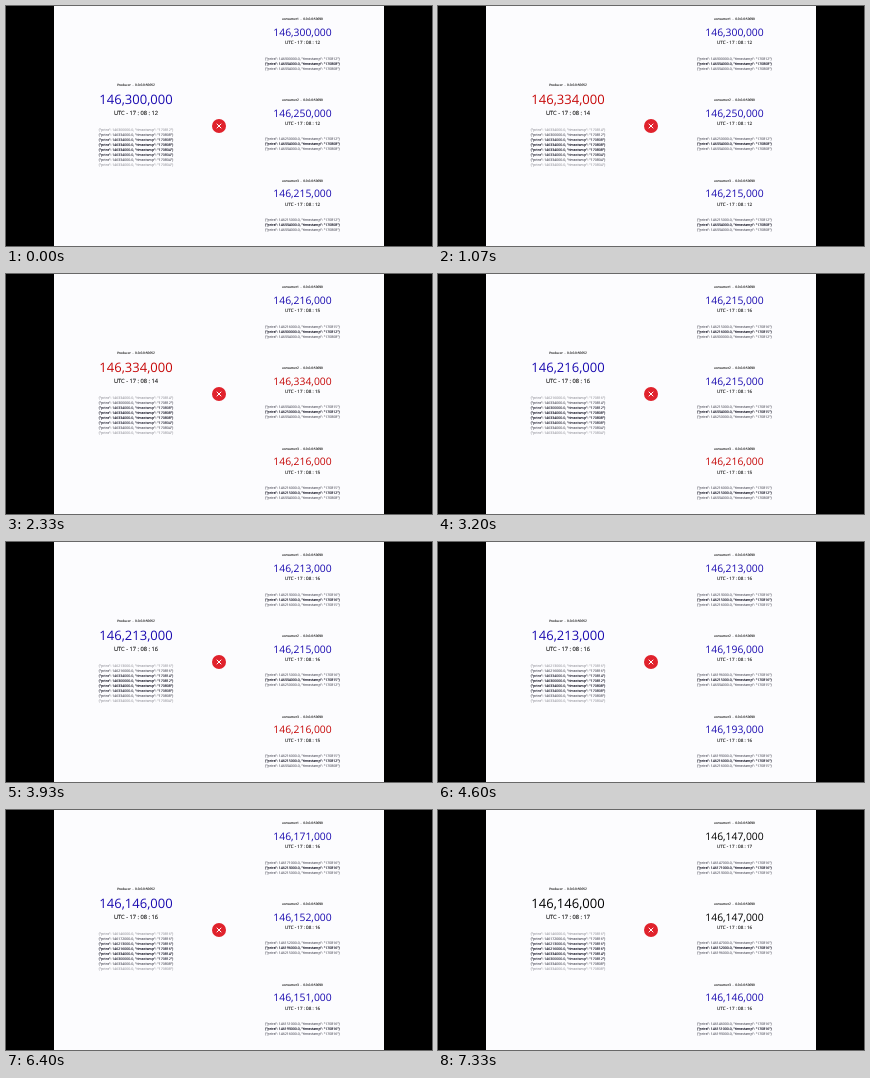
An HTML page that plays this animation: 426x240 px, repeating every 7390 ms.

```html
<!DOCTYPE html>
<html lang="en">
<head>
<meta charset="utf-8">
<title>Price stream</title>
<style>
  html, body { margin: 0; width: 100%; height: 100%; overflow: hidden; background: #000; }
  svg { display: block; width: 100vw; height: 100vh; }
  text { font-family: "Open Sans", "Noto Sans", sans-serif; text-rendering: geometricPrecision; white-space: pre; }
  .mid { text-anchor: middle; }
  .small { stroke: currentColor; stroke-width: .12px; }
</style>
</head>
<body>
<svg viewBox="0 0 426 240">
  <rect width="426" height="240"/>
  <rect x="48" width="330" height="240" fill="#fcfcfe"/>
  <g id="panels"></g>
  <circle cx="213" cy="120" r="7" fill="#e0222c"/>
  <path d="M211 118l4 4m0-4l-4 4" stroke="#fff" stroke-width="1" stroke-linecap="round"/>
</svg>
<script>
const LOOP = 7390, ROUND = 1300;
const SETTLE = 5.55, NEXT_SECOND = 5.6; // in rounds
const UP = '#c60808', DOWN = '#1a0bb0', SAME = '#000';

// Prices in thousands, one per round; pace is seconds of clock per round
const producer = { name: 'Producer  -  0.0.0.0:50052', prices: [300, 334, 216, 213, 172, 146],
  delay: -260, pace: 2, cx: 130, y: 79.6, size: 13, priceY: 18.5, clockY: 29, logY: 45.4, rows: 8 };
const consumers = [
  [300, 216, 215, 213, 171, 147],
  [250, 334, 215, 196, 152, 147],
  [215, 216, 216, 193, 151, 146]
].map((prices, n) => ({ name: `consumer${n + 1}  -  0.0.0.0:50090`, prices,
  delay: 80 * n, pace: 3, cx: 296.5, y: 14.4 + 80.7 * n, size: 10.35,
  priceY: 15.6, clockY: 24, logY: 39.2, rows: 3 }));
const panels = [producer, ...consumers];

const text = (x, y, size, color, body, kind, opacity = 1) =>
  `<text x="${x}" y="${y}" font-size="${size}" fill="${color}" color="${color}" class="${kind}" opacity="${opacity}">${body}</text>`;

const second = (panel, i) => Math.min(12 + panel.pace * i, 16);

function trend({ prices }, i) {
  return i && prices[i] > prices[i - 1] ? UP : DOWN;
}

function logRow(panel, current, n) {
  const i = current - n;
  const price = i < 0 ? 334 : panel.prices[i];
  const sec = i < 0 ? (i > -4 ? 8 : 4) : second(panel, i);
  const fade = .2 + .8 * Math.sin(Math.PI * (n + .5) / panel.rows);
  return text(panel.cx - 37.6, panel.y + panel.logY + 5.05 * n, 3.5, '#101020',
    `{"price": 146${price}000.0, "timestamp": "1708${String(sec).padStart(2, '0')}"}`, 'small', fade);
}

function drawPanel(panel, t) {
  const { prices, cx, y, size } = panel;
  const progress = (t - panel.delay) / ROUND;
  const round = Math.max(0, Math.min(Math.floor(progress), prices.length - 1));
  const i = prices.indexOf(prices[round]); // a repeated price keeps its first tick
  const color = progress >= SETTLE ? SAME : trend(panel, i);
  const sec = second(panel, i) + (progress >= NEXT_SECOND);
  let out = text(cx, y, 3.2, '#222', panel.name, 'mid small')
    + text(cx, y + panel.priceY, size, color, `146,${prices[i]},000`, 'mid')
    + text(cx, y + panel.clockY, size * .44, '#1c1c1c', `UTC - 17 : 08 : ${sec}`, 'mid small');
  for (let n = 0; n < panel.rows; n++) out += logRow(panel, i, n);
  return out;
}

const stage = document.getElementById('panels');
const start = performance.now();
let shown = '';
function frame() {
  const t = (performance.now() - start) % LOOP;
  const next = panels.map(p => drawPanel(p, t)).join('');
  if (next !== shown) stage.innerHTML = shown = next;
  requestAnimationFrame(frame);
}
frame();
</script>
</body>
</html>
```
